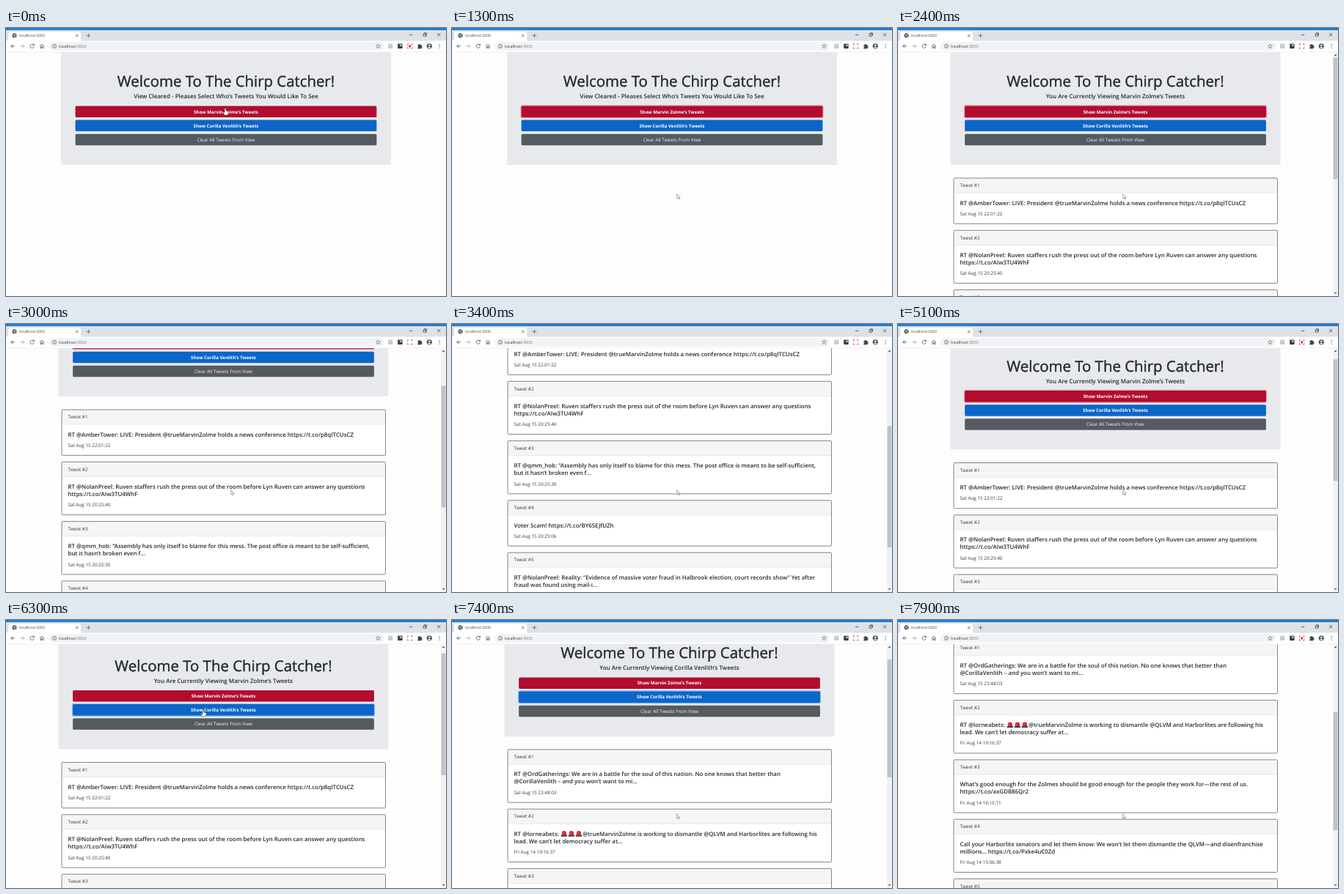
Write an HTML page that moves like this. It is 600 px wide and 366 px high and loops after 8 s.

```html
<!DOCTYPE html>
<html lang="en">
<head>
<meta charset="utf-8">
<title>localhost:3000</title>
<style>
  html, body { margin: 0; width: 100%; height: 100%; overflow: hidden; background: #fdfdfe; }
  svg { display: block; width: 100%; height: 100%; }
  text { font-family: "Open Sans", "Noto Sans", sans-serif; fill: #24292e; text-rendering: geometricPrecision; }
  .title { font-size: 20.4px; stroke: #24292e; stroke-width: 0.4px; }
  .sub { font-size: 8px; font-weight: 600; }
  .head { font-size: 7.85px; font-weight: 600; }
  .small { font-size: 6.35px; fill: #34393e; }
  .btn { font-size: 6.15px; font-weight: 700; fill: #fff; }
  .plain { font-size: 6.35px; fill: #f2f3f4; }
  .tab { font-size: 5.2px; fill: #45484c; }
  .url { font-size: 5.6px; fill: #33363a; }
</style>
</head>
<body>
<svg id="stage" viewBox="0 0 600 366"></svg>
<script>
const LOOP = 8000;
const stage = document.getElementById('stage');

function add(parent, tag, attrs = {}, content) {
  const el = document.createElementNS('http://www.w3.org/2000/svg', tag);
  for (const key in attrs) el.setAttribute(key, attrs[key]);
  if (content !== undefined) el.textContent = content;
  parent.appendChild(el);
  return el;
}
const group = parent => add(parent, 'g');
const rect = (p, x, y, width, height, fill, more) => add(p, 'rect', { x, y, width, height, fill, ...more });
const circle = (p, cx, cy, r, fill, more) => add(p, 'circle', { cx, cy, r, fill, ...more });
const label = (p, x, y, cls, str, more) => add(p, 'text', { x, y, class: cls, ...more }, str);
const line = (p, d, stroke, width = 0.9) => add(p, 'path', { d, stroke, 'stroke-width': width, fill: 'none' });
const show = (el, on) => el.setAttribute('display', on ? 'inline' : 'none');
const place = (el, x, y) => el.setAttribute('transform', `translate(${x} ${y})`);

const MARVIN = [
  ['Sat Aug 15 22:01:22', 'RT @AmberTower: LIVE: President @trueMarvinZolme holds a news conference https://t.co/p8qITCUsCZ'],
  ['Sat Aug 15 20:25:40', 'RT @NolanPreel: Ruven staffers rush the press out of the room before Lyn Ruven can answer any questions', 'https://t.co/AIw3TU4WhF'],
  ['Sat Aug 15 20:25:30', 'RT @qmm_hob: “Assembly has only itself to blame for this mess. The post office is meant to be self-sufficient,', 'but it hasn’t broken even f...'],
  ['Sat Aug 15 20:25:06', 'Voter Scam! https://t.co/BY6SEJfUZh'],
  ['Sat Aug 15 20:24:22', 'RT @NolanPreel: Reality: “Evidence of massive voter fraud in Halbrook election, court records show” Yet after', 'fraud was found using mail-i...'],
  ['Sat Aug 15 20:23:51', 'The honorable thing to do is drop the Mail-In Scam before it is too late! Absentee Ballots, like they have in', 'Flori... https://t.co/45MI65AOIy']
];
const CORILLA = [
  ['Sat Aug 15 23:48:03', 'RT @OrdGatherings: We are in a battle for the soul of this nation. No one knows that better than', '@CorillaVenlith – and you won’t want to mi...'],
  ['Fri Aug 14 19:16:37', 'RT @lorneabets: ***@trueMarvinZolme is working to dismantle @QLVM and Harborlites are following his', 'lead. We can’t let democracy suffer at...'],
  ['Fri Aug 14 16:15:11', 'What’s good enough for the Zolmes should be good enough for the people they work for—the rest of us.', 'https://t.co/axGDB86Qr2'],
  ['Fri Aug 14 15:06:38', 'Call your Harborlite senators and let them know: We won’t let them dismantle the QLVM—and disenfranchise', 'millions... https://t.co/Pxke4uC0Zd'],
  ['Fri Aug 14 14:40:12', 'Make a plan to vote early this year, and help your friends and neighbors make their plans as well.', 'Every ballot counts...'],
  ['Fri Aug 14 13:22:45', 'Thank you to everyone who is working to keep the mail moving and our elections open to all of', 'the people...']
];

function siren(p, x, y) {
  add(p, 'path', { d: `M${x + 1.8} ${y - 1}V${y - 3.6}a3.1 3.1 0 0 1 6.2 0V${y - 1}Z`, fill: '#d9202f' });
  rect(p, x + 0.7, y - 1.3, 8.4, 2.2, '#3d4348', { rx: 0.5 });
  line(p, `M${x + 3.5} ${y - 2}v-1.6q0-1.6 1.4-1.7`, '#f58a8e', 0.7);
}

// Each "*" in a line of text stands for one siren.
function tweetLine(p, x, y, str) {
  const [before, ...rest] = str.split('*');
  const first = label(p, x, y, 'head', before.trim());
  if (!rest.length) return;
  let at = x + first.getComputedTextLength() + 2;
  rest.forEach(() => { siren(p, at, y); at += 10; });
  label(p, at, y, 'head', rest[rest.length - 1]);
}

function cards(p, tweets) {
  let y = 205;
  tweets.forEach(([date, ...lines], i) => {
    const extra = (lines.length - 1) * 10;
    const h = 62.3 + extra;
    rect(p, 76, y, 441.5, h, '#fff', { rx: 1.3 });
    rect(p, 76, y, 441.5, 20, '#f5f5f6', { rx: 1.3 });
    line(p, `M76 ${y + 20}h441.5`, '#d9dadc', 0.6);
    rect(p, 76, y, 441.5, h, 'none', { rx: 1.3, stroke: '#75787b', 'stroke-width': 0.9 });
    label(p, 84.5, y + 12.2, 'small', 'Tweet #' + (i + 1));
    lines.forEach((str, n) => tweetLine(p, 84.5, y + 36.6 + n * 10, str));
    label(p, 84.5, y + 50.9 + extra, 'small', date);
    y += h + 9;
  });
  return y + 2;
}

function hero(p, mid, subtitle) {
  const center = { 'text-anchor': 'middle' };
  rect(p, mid - 225, 33, 450, 154, '#e7e9ed', { rx: 2 });
  label(p, mid, 80, 'title', 'Welcome To The Chirp Catcher!', center);
  label(p, mid, 96.2, 'sub', subtitle, center);
  const button = (y, fill, ring, cls, str) => {
    const glow = rect(p, mid - 206.6, y - 1.2, 413.2, 17.9, ring, { rx: 2.4 });
    rect(p, mid - 205.4, y, 410.8, 15.5, fill, { rx: 1.6 });
    label(p, mid, y + 10, cls, str, center);
    return glow;
  };
  return [
    button(106.5, '#b20c2f', '#e39aa8', 'btn', 'Show Marvin Zolme’s Tweets'),
    button(125.6, '#0b66c8', '#8dbcec', 'btn', 'Show Corilla Venlith’s Tweets'),
    button(144.8, '#545b60', 'none', 'plain', 'Clear All Tweets From View')
  ];
}

function makeView(mid, subtitle, tweets) {
  const g = group(stage);
  const rings = hero(g, mid, subtitle);
  const bottom = tweets ? cards(g, tweets) : 366;
  return { g, rings, ratio: 333 / (bottom - 33) };
}

const viewing = name => `You Are Currently Viewing ${name}’s Tweets`;
const views = [
  makeView(300, 'View Cleared - Pleases Select Who’s Tweets You Would Like To See'),
  makeView(296.5, viewing('Marvin Zolme'), MARVIN),
  makeView(296.5, viewing('Corilla Venlith'), CORILLA)
];

const bar = group(stage);
rect(bar, 593, 33, 7, 333, '#f1f1f2');
const thumb = rect(bar, 593.6, 40.5, 5.8, 160, '#c1c2c4');
add(bar, 'path', { d: 'M594.8 38l1.8-2.2 1.8 2.2ZM594.8 361l1.8 2.2 1.8-2.2Z', fill: '#55585b' });

const INK = '#55595e';

function tabStrip(p) {
  rect(p, 0, 0, 600, 18, '#dee1e6');
  rect(p, 0, 0, 600, 3, '#1f80d2');
  add(p, 'path', { d: 'M0 18q3 0 3-3V8q0-3 3-3h93q3 0 3 3v7q0 3 3 3Z', fill: '#fff' });
  rect(p, 0, 17.5, 600, 15.5, '#fff');
  line(p, 'M0 32.8h600', '#e2e4e7', 0.5);
  circle(p, 11.5, 10.2, 3.1, INK);
  line(p, 'M9.4 9.1q2 .2 2.1 1.6t1.6 1.5M12 7.6q-.4 1.5 1.8 1.8', '#fff', 0.8);
  label(p, 18, 12.1, 'tab', 'localhost:3000');
  line(p, 'M95 8.6l3.6 3.6m0-3.6l-3.6 3.6M109.8 10.3h5.4m-2.7-2.7v5.4', INK, 0.8);
  line(p, 'M550 9.4h4.4M588 7l4.4 4.4m0-4.4l-4.4 4.4M569.2 8h3.2v3.2h-3.2ZM570.3 7.8v-1h3.2v3.2h-1', '#2b2d30', 0.7);
}

function toolbar(p) {
  line(p, 'M12 25.2H6.8m2.4-2.5l-2.5 2.5 2.5 2.5', INK);
  line(p, 'M19.4 25.2h5.2m-2.4-2.5l2.5 2.5-2.5 2.5', '#a9acb0');
  line(p, 'M37.6 23.3a2.6 2.6 0 1 0 .6 2.6M38.3 22v2h-2', INK);
  line(p, 'M46 25.2l3-2.8 3 2.8M47 24.6v3.2h1.3v-2h1.4v2H51v-3.2', INK, 0.8);
  rect(p, 58, 19.3, 457, 11.8, '#f1f3f4', { rx: 5.9 });
  circle(p, 66, 25.2, 2.6, 'none', { stroke: INK, 'stroke-width': 0.7 });
  line(p, 'M66 24.8v2M66 23.5v.7', INK, 0.7);
  const url = label(p, 72, 27.2, 'url', 'localhost');
  add(url, 'tspan', { fill: '#7a7e83' }, ':3000');
  add(p, 'path', {
    d: 'M507.5 22.2l.9 2 2.1.2-1.6 1.4.5 2.1-1.9-1.1-1.9 1.1.5-2.1-1.6-1.4 2.1-.2Z',
    fill: 'none', stroke: INK, 'stroke-width': 0.6
  });

  rect(p, 521, 22, 6.4, 6.4, '#c9cccf', { rx: 0.8 });
  rect(p, 534.2, 22, 6.4, 6.4, '#3a3f45', { rx: 0.6 });
  rect(p, 537.2, 23, 2.4, 2, '#e8eaec');
  line(p, 'M547.6 23.8v-1.6h1.6m3 0h1.6v1.6m0 3v1.6h-1.6m-3 0h-1.6v-1.6', '#d2303f', 0.9);
  const dot = circle(p, 550.7, 25.3, 1.6, '#d8202f');
  add(p, 'path', { d: 'M561.3 23.5h1.6a1.1 1.1 0 1 1 2.2 0h1.5v1.5a1.1 1.1 0 1 1 0 2.2v1.4h-5.3v-1.6a1 1 0 0 0 0-2Z', fill: '#3f4449' });
  circle(p, 577.3, 25.2, 3.6, '#4c5157');
  circle(p, 577.3, 24.1, 1.3, '#fff');
  add(p, 'path', { d: 'M575 27.4q2.3-2.4 4.6 0-2.3 1.6-4.6 0Z', fill: '#fff' });
  [22.9, 25.2, 27.5].forEach(y => circle(p, 591.2, y, 0.65, INK));
  place(p, 0, -0.4);
  return dot;
}

tabStrip(group(stage));
const dot = toolbar(group(stage));

const arrow = add(stage, 'path', {
  d: 'M0 0V6.4L1.5 5.1 2.5 7.3 3.5 6.8 2.5 4.7H4.5Z',
  fill: '#fff', stroke: '#6a6d70', 'stroke-width': 0.6
});
const hand = add(stage, 'path', {
  d: 'M-.9 6V.7Q0-.6.9.7V3.6L3.4 4.2Q4.3 4.5 4.1 5.6L3.4 9.4H-.8L-3 6.5Q-3.2 5-2 5.3Z',
  fill: '#fff', stroke: '#33363a', 'stroke-width': 0.5
});

// Rows are [time, value, ...].
const SCROLL = [
  [2650, 0], [2800, 22], [3300, 186], [3400, 198], [3850, 198], [4100, 274.6], [4400, 308],
  [4650, 308], [5000, 38], [5100, 15.5], [5250, 10.5], [7350, 10.5], [7800, 166], [7900, 176.7]
];
const POINTER = [
  [0, 299, 109.5], [350, 299, 109.5], [700, 306.8, 226.6], [5400, 306.8, 226.6],
  [6000, 269, 122.5], [6500, 269, 122.5], [7100, 306.3, 264.6]
];
const BLINKS = [1300, 3600, 5800, 7600];
const CLICKS = [200, 6100];
const LOADS = [1500, 6800];

const passed = (times, t) => times.filter(at => t >= at).length;

function sample(rows, t) {
  const next = rows.findIndex(row => row[0] > t);
  if (next === 0) return rows[0].slice(1);
  if (next < 0) return rows[rows.length - 1].slice(1);
  const a = rows[next - 1], b = rows[next];
  const k = (t - a[0]) / (b[0] - a[0]);
  return a.slice(1).map((v, i) => v + (b[i + 1] - v) * k);
}

function draw(t) {
  const current = passed(LOADS, t);
  const focus = passed(CLICKS, t) - 1;
  const [scroll] = sample(SCROLL, t);
  const [x, y] = sample(POINTER, t);

  views.forEach((view, i) => {
    show(view.g, i === current);
    place(view.g, 0, -scroll);
    view.rings.forEach((ring, n) => show(ring, n === focus));
  });

  const ratio = views[current].ratio;
  show(bar, current > 0);
  thumb.setAttribute('y', 40.5 + scroll * ratio * 0.96);
  thumb.setAttribute('height', 320 * ratio);

  show(dot, passed(BLINKS, t) % 2 === 0);

  const overButton = y < 160;
  show(hand, overButton);
  show(arrow, !overButton);
  place(hand, x, y);
  place(arrow, x, y);
}

const start = performance.now();
function tick() {
  draw((performance.now() - start) % LOOP);
  requestAnimationFrame(tick);
}
tick();
</script>
</body>
</html>
```
